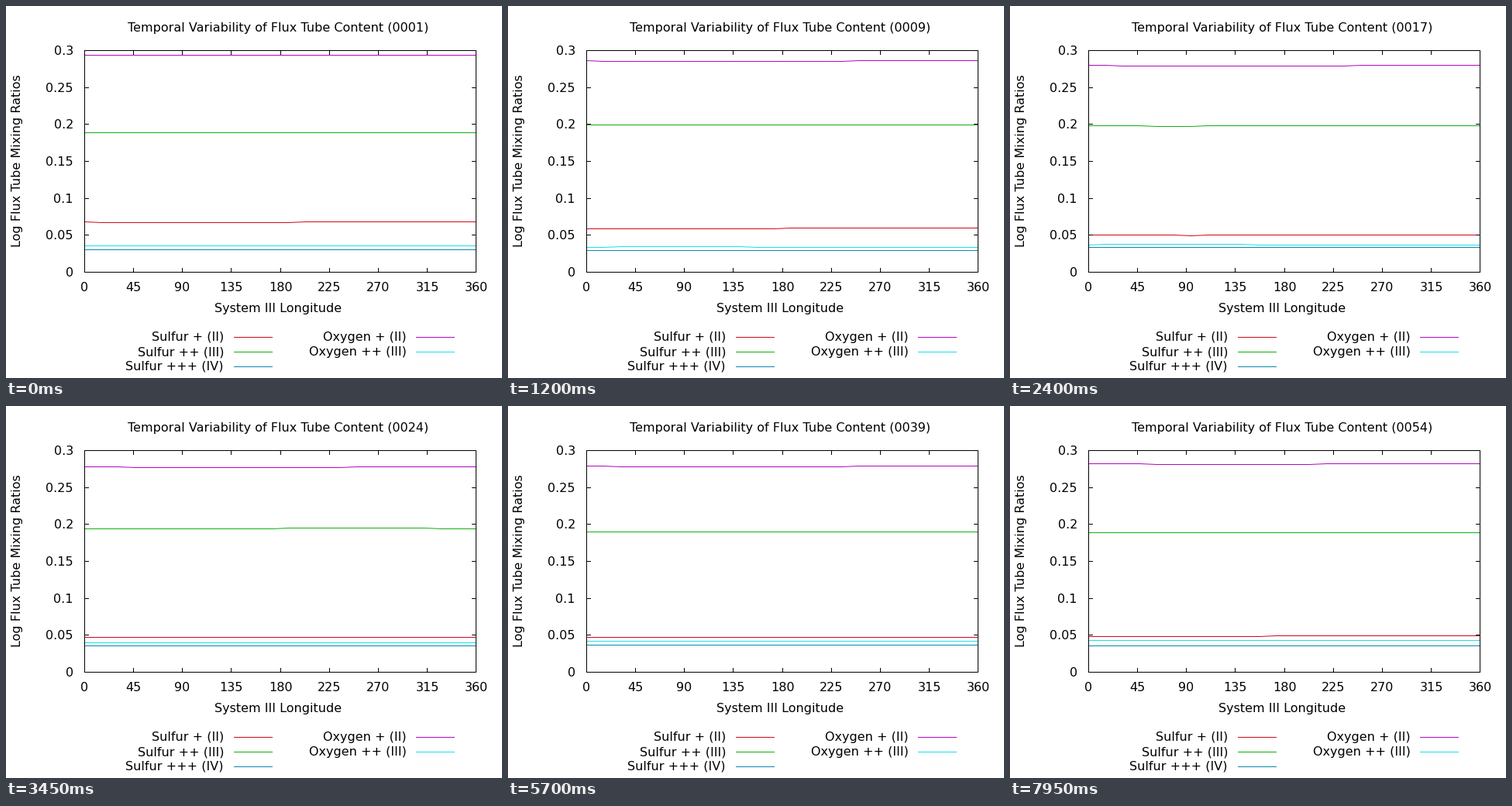
Write a matplotlib script that moves like this. It is 640x480 px and loops after 8 s.

```python
import numpy as np
import matplotlib.pyplot as plt
from matplotlib.animation import FuncAnimation

WIDTH, HEIGHT, DPI = 640, 480, 80
PX = 72 / DPI                       # one pixel in points
TICK_MS, STEP_MS, LOOP_MS = 50, 150, 8000
LEFT, RIGHT, TOP, BOTTOM = 101, 606, 57, 343
POINTS = 24
TICK = 5

plt.rcParams["font.family"] = "DejaVu Sans"
plt.rcParams["font.size"] = 16 * PX

# Mean height of each curve (pixel rows) and the phase of its ripple at key steps
KEY_STEPS = np.array([1, 9, 17, 24, 32, 39, 54])
SPECIES = [
    dict(label="Sulfur + (II)", color="#d00818", ripple=0.4, key=(0, 0),
         mean=[278.5, 286.5, 295.103, 298, 298.552, 298, 296.448],
         phase=[6.5, 5.5, 6, 5.5, 5, 5, 5]),
    dict(label="Sulfur ++ (III)", color="#10b010", ripple=0.4, key=(0, 1),
         mean=[163, 153, 154.13, 157.653, 160.183, 162, 163],
         phase=[5, 5, 5, 4, 4, 4, 4]),
    dict(label="Sulfur +++ (IV)", color="#0888b0", ripple=0, key=(0, 2),
         mean=[314, 315, 311, 309, 308, 308, 309],
         phase=[5] * 7),
    dict(label="Oxygen + (II)", color="#b008c0", ripple=0.4, key=(1, 0),
         mean=[63, 70.65, 76.604, 78.552, 78.552, 77.604, 74.396],
         phase=[8, 8, 8.5, 9, 9, 8.5, 8.5]),
    dict(label="Oxygen ++ (III)", color="#18e0e8", ripple=-0.4, key=(1, 1),
         mean=[309, 310.7, 307.653, 305, 304, 303, 302],
         phase=[5.5, 5.5, 5, 5, 5, 5, 5]),
]

fig = plt.figure(figsize=(WIDTH / DPI, HEIGHT / DPI), dpi=DPI, facecolor="white")
ax = fig.add_axes([0, 0, 1, 1])
ax.set(xlim=(0, WIDTH), ylim=(HEIGHT, 0))
ax.axis("off")


def stroke(xs, ys, color="black", zorder=3):
    """One-pixel line through the centres of the given pixels."""
    line, = ax.plot(np.array(xs) + 0.5, np.array(ys) + 0.5, color=color,
                    lw=PX, zorder=zorder, snap=False,
                    solid_capstyle="projecting", solid_joinstyle="miter")
    return line


def write(x, y, text, ha="center", **kw):
    return ax.text(x, y, text, ha=ha, va="baseline", **kw)


def smooth(keys, values, x):
    """Cubic Hermite interpolation."""
    values = np.array(values, float)
    slopes = np.gradient(values, keys, edge_order=2)
    i = int(np.clip(np.searchsorted(keys, x, side="right") - 1, 0, len(keys) - 2))
    h = keys[i + 1] - keys[i]
    u = (x - keys[i]) / h
    return ((1 + 2 * u) * (1 - u) ** 2 * values[i] + u * (1 - u) ** 2 * h * slopes[i]
            + u * u * (3 - 2 * u) * values[i + 1] + u * u * (u - 1) * h * slopes[i + 1])


def curve_rows(species, step):
    mean = smooth(KEY_STEPS, species["mean"], step)
    phase = np.interp(step, KEY_STEPS, species["phase"])
    angle = 2 * np.pi * (np.arange(POINTS) - phase) / POINTS
    return np.floor(mean + species["ripple"] * np.cos(angle) + 0.5)


def draw_frame_and_labels():
    stroke([LEFT, RIGHT, RIGHT, LEFT, LEFT], [TOP, TOP, BOTTOM, BOTTOM, TOP])
    for k in range(9):
        x = int(LEFT + (RIGHT - LEFT) * k / 8 + 0.5)
        stroke([x, x], [BOTTOM - TICK, BOTTOM])
        stroke([x, x], [TOP, TOP + TICK])
        write(x + 0.5, 368, str(45 * k))
    for k in range(7):
        y = int(BOTTOM - (BOTTOM - TOP) * k / 6 + 0.5)
        stroke([LEFT, LEFT + TICK], [y, y])
        stroke([RIGHT - TICK, RIGHT], [y, y])
        write(87, y + 6, f"{0.05 * k:.2g}", ha="right")
    write(351, 395, "System III Longitude")
    write(19, 200, "Log Flux Tube Mixing Ratios", rotation=90, rotation_mode="anchor")


def draw_legend():
    for s in SPECIES:
        column, row = s["key"]
        x, y = (294, 529)[column], 427 + 19 * row
        stroke([x, x + 49], [y, y], s["color"])
        write((281, 517)[column], y + 5, s["label"], ha="right")


draw_frame_and_labels()
draw_legend()
title = write(351, 33, "")
columns = LEFT + np.round((RIGHT - LEFT) * np.arange(POINTS) / (POINTS - 1))
curves = [stroke(columns, curve_rows(s, 1), s["color"], zorder=2) for s in SPECIES]


def update(frame):
    step = frame * TICK_MS // STEP_MS + 1
    title.set_text(f"Temporal Variability of Flux Tube Content ({step:04d})")
    for line, s in zip(curves, SPECIES):
        line.set_ydata(curve_rows(s, step) + 0.5)
    return [title, *curves]


anim = FuncAnimation(fig, update, frames=LOOP_MS // TICK_MS, interval=TICK_MS,
                     repeat=True, repeat_delay=0, blit=False)
plt.show()
```
